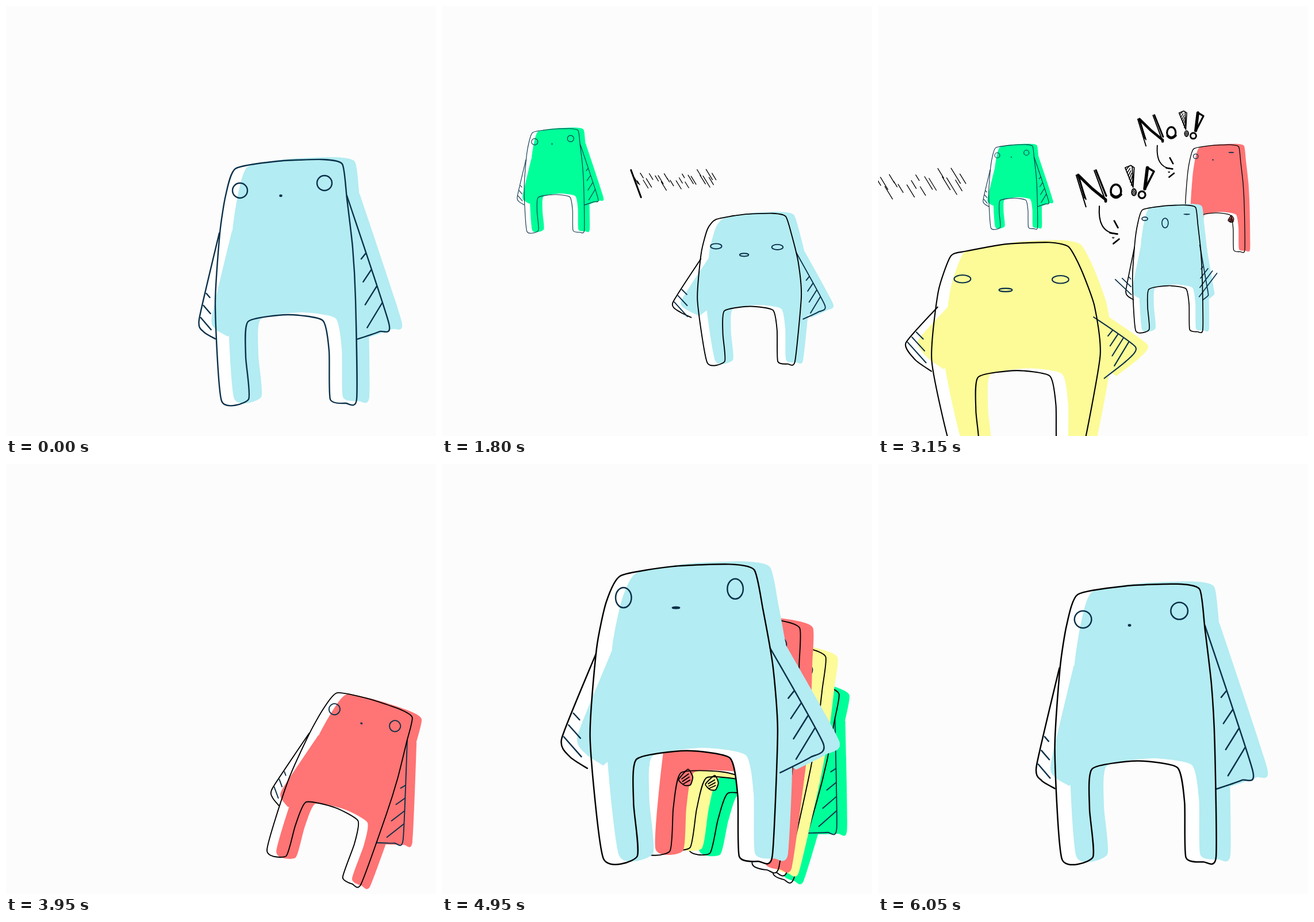
Animation, 748 px wide and 748 px high, one loop 6.1 s. Source, as an HTML page:

```html
<!DOCTYPE html>
<html lang="en">
<head>
<meta charset="utf-8">
<title>No!!</title>
<style>
html, body { margin: 0; width: 100%; height: 100%; overflow: hidden; background: #fcfcfc; }
svg { display: block; width: 100%; height: 100%; }
path, ellipse { vector-effect: non-scaling-stroke; }
</style>
</head>
<body>
<svg id="stage" viewBox="0 0 748 748" fill="none" stroke-linecap="round" stroke-linejoin="round"></svg>
<script>
const LOOP = 6100, STEP = 50, GROUND = 690, PIVOT = 610;
const NAVY = '#0a3049', BLACK = '#000';
const BLUE = '#b3ecf2', GREEN = '#00ff99', YELLOW = '#fcfb98', RED = '#ff7474';
const stage = document.getElementById('stage');

// A pose is a handful of deformations of one resting figure.
const CALM = {
  squash: 0, tall: 1, armL: 0, armR: 0, lift: 0, shoulder: 0, flail: 0,
  eyeDrop: 0, eyeW: 13, eyeH: 13, wink: 1, mouthDrop: 0, mouthW: 1.5, mouthH: 1
};
const SHOUT = { ...CALM, tall: 1.045, armL: 5, armR: -38, shoulder: 58, flail: 1,
  eyeDrop: -8, eyeW: 10, eyeH: 6, wink: .08, mouthDrop: -3, mouthW: 11, mouthH: 17 };
const GRUMBLE = { ...SHOUT, eyeH: 10, mouthW: 1.5, mouthH: 1 };
const SQUINT = { ...CALM, squash: 1, armL: -53, armR: 24, lift: -18, shoulder: 64,
  eyeDrop: 55, eyeW: 15, eyeH: 7, mouthDrop: 69, mouthW: 12, mouthH: 4 };
const CRUSHED = { ...SQUINT, squash: 1.8, armL: -46, armR: 40, lift: -58, shoulder: 110,
  eyeDrop: 50, mouthDrop: 61, mouthH: 3 };
const WIDE = { ...CALM, squash: .5, armL: -19, armR: 15, lift: -25, shoulder: 64,
  eyeDrop: 3, eyeW: 11, eyeH: 14, mouthDrop: 8, mouthW: 5, mouthH: 1 };
const PUFFED = { ...WIDE, squash: 1.2, tall: .95, armL: -53, armR: 24 };
const TALL = { ...CALM, tall: 1.21 };
const REST = { ...CALM, tall: 1.025 };

// Places the right foot at x, y.
const put = (s, x, y, deg = 0) => ({ s, x, y, deg });
const frame = ({ s, x, y, deg }) =>
  `translate(${x} ${y}) rotate(${deg}) scale(${s}) translate(${-PIVOT} ${-GROUND})`;

const clamp = k => Math.max(0, Math.min(1, k));
const ease = k => k * k * (3 - 2 * k);
const mix = (a, b, k) => a + (b - a) * k;
const between = (a, b, k) => [mix(a[0], b[0], k), mix(a[1], b[1], k)];
const shift = (a, x, y) => [a[0] + x, a[1] + y];

function track(t, ...keys) {
  if (t <= keys[0][0]) return keys[0][1];
  for (let i = 1; i < keys.length; i++) {
    const [t0, p] = keys[i - 1], [t1, q] = keys[i];
    if (t > t1) continue;
    const k = ease((t - t0) / (t1 - t0));
    return Object.fromEntries(Object.keys(p).map(name => [name, mix(p[name], q[name], k)]));
  }
  return keys[keys.length - 1][1];
}

const n = v => v.toFixed(1);
const xy = p => p.map(n).join(' ');
const segment = (a, b) => `M${xy(a)}L${xy(b)}`;

function curve(pts, closed) {
  const last = pts.length - 1;
  const pt = i => closed ? pts[(i + pts.length) % pts.length] : pts[Math.max(0, Math.min(last, i))];
  let d = 'M' + xy(pt(0));
  for (let i = 0; i < (closed ? pts.length : last); i++) {
    const [o, a, b, c] = [pt(i - 1), pt(i), pt(i + 1), pt(i + 2)];
    const bend = (p, q, r, k) => p.map((v, j) => v + (r[j] - q[j]) * k);
    d += `C${xy(bend(a, o, b, .1))} ${xy(bend(b, a, c, -.1))} ${xy(b)}`;
  }
  return closed ? d + 'Z' : d;
}

const stroke = (d, w, c = BLACK) => `<path d="${d}" stroke="${c}" stroke-width="${n(w)}"/>`;
const paint = (d, c) => `<path d="${d}" fill="${c}"/>`;

function outline(p) {
  const q = p.squash, top = 21 * q;
  return [
    [399, 283 + top], [472, 270 + top], [550, 267 + top], [585, 275 + top],
    [593 + 8 * q, 335 + 10 * q], [603 + 16 * q, 420], [608 + 19 * q, 510],
    [610, 684], [591, 691], [564, 684], [562, 600], [551, 547],
    [490, 537], [421, 549], [417, 610], [422, 684], [375, 687],
    [364 - 15 * q, 520], [372 - 13 * q, 395], [382 - 6 * q, 330]
  ].map(([x, y]) => [x, GROUND - (GROUND - y) * p.tall]);
}

function arms(p) {
  const q = p.squash;
  const fromL = [371 - 13 * q, 395 + 15 * q], tipL = [336 + p.armL, 545 + p.lift];
  const endL = [364 + .6 * p.armL, 579 + .7 * p.lift];
  const fromR = [593 + .11 * p.shoulder + 14 * q, 330 + p.shoulder], tipR = [666 + p.armR, 552 + p.lift];
  const endR = [610 + 22 * q, 580 + .5 * p.lift];
  const left = [fromL, tipL, shift(between(tipL, endL, .5), -6, 5), endL];
  const right = [fromR, tipR, shift(between(tipR, endR, .4), 6, 3), endR];
  let hatch = '';
  for (let i = 0; i < 4; i++) {
    const out = between(fromR, tipR, .45 + .13 * i);
    hatch += segment(shift(out, -8 - 6 * i, 10 + 11 * i), shift(out, p.flail * i * 12, -p.flail * i * 13));
  }
  for (let i = 0; i < 3; i++) {
    const out = between(fromL, tipL, .7 + .14 * i), grow = 1 - p.armL / 60;
    hatch += segment(shift(out, (8 + 6 * i) * grow, (7 + 7 * i) * grow), shift(out, 2 - p.flail * i * 20, -p.flail * i * 17));
  }
  return { left: curve(left), right: curve(right), hatch };
}

// A folded arm peeping out below the belly.
function hand(x, colour, width) {
  const y = 555;
  const palm = [[x - 11, y + 6], [x + 2, y - 14], [x + 12, y - 2], [x + 10, y + 12], [x, y + 14]];
  let d = curve(palm, true);
  const back = paint(d, colour);
  for (let i = 0; i < 3; i++) d += segment([x - 6 + i * 2, y + 4 + i * 4], [x + 4 + i * 2, y - 6 + i * 5]);
  return back + stroke(d, width);
}

function figure(p, place, colour, width, ink = BLACK, handX = 0) {
  const body = curve(outline(p), true), arm = arms(p);
  const join = 'L490 450Z';
  const parts = handX ? [body] : [body, arm.left + join, arm.right + join];
  const fill = c => parts.map(d => paint(d, c)).join('');
  const oval = (x, y, rx, ry) =>
    `<ellipse cx="${n(x)}" cy="${n(GROUND - (GROUND - y) * p.tall)}" rx="${n(rx)}" ry="${n(ry)}" stroke="${NAVY}" stroke-width="${width}"/>`;
  const limbs = handX ? hand(handX, colour, width)
    : stroke(arm.left, width, ink) + stroke(arm.right, width, NAVY) + stroke(arm.hatch, width, NAVY);
  return `<g transform="${frame(place)}">${fill('#fff')}<g transform="translate(22 -4)">${fill(colour)}</g>` +
    limbs + stroke(body, width, ink) +
    oval(407 - 8 * p.squash, 321 + p.eyeDrop, p.eyeW, p.eyeH) +
    oval(554 + 9 * p.squash, 308 + 1.28 * p.eyeDrop, p.eyeW, p.eyeH * p.wink) +
    oval(478 - 4 * p.squash, 330 + p.mouthDrop, p.mouthW, p.mouthH) + '</g>';
}

const ring = (x, y, rx, ry) => `M${x - rx} ${y}a${rx} ${ry} 0 1 1 ${2 * rx} 0a${rx} ${ry} 0 1 1 ${-2 * rx} 0Z`;

function lettering(k) {
  let shade = '';
  for (let i = 0; i < 6; i++) shade += segment([342 + i * 3.5, 124 + i * 11], [352 + i * 3, 112 + i * 8]);
  for (let i = 0; i < 3; i++) shade += segment([362 + i * 3, 205 + i * 4], [370 + i * 3, 194 + i * 4]);
  return stroke('M167 143L201 254M172 143L201 228M230 127L270 234', 3 * k) +
    stroke('M174 143L197 222M236 126L272 216', 4.5 * k) +
    stroke('M174 143L222 190L270 229V235', 7 * k) +
    stroke(ring(306, 199, 18, 23), 5 * k) + stroke('M291 212Q306 228 323 211', 7 * k) +
    stroke('M338 117L358 109L370 117L366 186ZM363 113L366 180' + ring(369, 203, 8, 12), 2.5 * k) +
    stroke(shade, 2 * k) +
    stroke('M417 117L439 130L408 191Z', 5 * k) + stroke('M416 117L407 191', 8 * k) +
    stroke(ring(397, 212, 12, 12), 4.5 * k) +
    stroke('M248 252C244 305 257 346 311 349', 3 * k) +
    stroke('M285 345L311 349M300 303L313 327M297 383L317 367', 4 * k) +
    stroke('M293 361H300M294 364H299', 1.5 * k);
}

// Loose pencil strokes, sketched before the letters.
function scribble() {
  let d = '';
  for (let i = 0; i < 28; i++) {
    const x = 180 + i * 8, len = 20 + 8 * Math.sin(i * 5) + (i > 20 ? 8 : 0);
    const y = 192 + 12 * Math.sin(i * 2.3) - (i > 20 ? 10 : 0);
    if (i % 7 !== 6) d += segment([x, y], [x + len * .52, y + len * .85]);
  }
  return stroke(d, 1.3) + stroke('M171 172L198 245', 3);
}

function say(place, u) {
  const art = u < 0 ? scribble() : lettering(Math.sqrt(place.s));
  const rise = ease(clamp((u - 320) / 200));
  return `<g transform="${frame(place)} translate(${n(-3 * rise)} ${n(-16 * rise)})">${art}</g>`;
}

// Squeeze, shout and relax; u counts from the shout.
function shouter(t, { peaks, place, colour, width, squint = SQUINT, shout = SHOUT, handX }) {
  const u = t - peaks.filter((p, i) => i === 0 || t >= p - 300).pop();
  const pose = track(u, [-300, CALM], [-100, squint], [-50, squint], [50, shout], [350, shout], [550, CALM]);
  const ink = t < 500 ? NAVY : BLACK;
  const talk = u >= -50 && u < 700 ? say(place, u) : '';
  return figure(pose, place, colour, width, ink, handX) + talk;
}

const BLUE_FAR = put(.65, 614, 622), BLUE_CROWD = put(.497, 565, 566);
const GREEN_FAR = put(.425, 247.5, 393), GREEN_CROWD = put(.345, 277.5, 387);
const RED_CROWD = put(.42, 638, 427);
const RED_BACK = put(.68, 627, 738, 24);

function crowd(t) {
  let out = '';
  if (t >= 1200) {
    const green = track(t, [1150, put(.1, 247.5, 393)], [1350, GREEN_FAR], [1850, GREEN_FAR],
      [1950, put(.425, 203, 393)], [2150, GREEN_FAR], [2250, GREEN_FAR], [2500, GREEN_CROWD]);
    out += figure(CALM, green, GREEN, 1.1, NAVY);
  }
  if (t >= 2200) out += shouter(t, {
    peaks: [2800], colour: RED, width: 1.3, shout: GRUMBLE, handX: 552,
    place: track(t, [2200, put(.55, 800, 420)], [2550, RED_CROWD], [3600, RED_CROWD], [3750, RED_BACK])
  });
  const blue = track(t, [1150, put(1, PIVOT, GROUND)], [1350, BLUE_FAR], [2250, BLUE_FAR], [2500, BLUE_CROWD]);
  out += shouter(t, {
    peaks: [500, 1850, 2950], colour: BLUE, place: blue, width: 1 + 1.4 * blue.s,
    squint: t < 1000 ? CRUSHED : SQUINT
  });
  if (t >= 2500) out += shouter(t, {
    peaks: [3200], colour: YELLOW, width: 2.1, squint: CRUSHED,
    place: track(t, [2450, put(.96, 355.6, 1200)], [2750, put(.96, 355.6, 781)])
  });
  return out;
}

function queue(t) {
  const BACK = put(.74, 616, 735, 20.6), HIDDEN = put(.9, 560, 690);
  const step = (colour, from, start, arrive, place, handX) => t < from || t >= 5400 ? '' :
    figure(CALM, track(t, ...start, [arrive, place], [5150, place], [5400, HIDDEN]), colour, 1.9, BLACK, handX);
  let out = step(GREEN, 4500, [[4500, put(.7, 622, 738, 22)]], 4900, put(.81, 610, 727, 17.3)) +
    step(YELLOW, 4150, [[4150, BACK]], 4850, put(.925, 599, 714, 13.7), 433) +
    step(RED, 3750, [[3800, RED_BACK], [3950, BACK]], 4450, put(1.02, 585, 708, 8.5), t < 4350 ? 0 : 430);
  if (t < 4500) return out;
  const wide = put(1.25, 574.5, 690), puffed = put(1.3, 590, 690), rest = put(1.24, 565, 690);
  const pose = track(t, [4500, CALM], [4700, PUFFED], [4850, WIDE], [5150, WIDE], [5300, PUFFED],
    [5500, TALL], [5800, REST], [5950, REST], [6050, CALM]);
  const place = track(t, [4500, put(1, 582, 694, 4)], [4700, puffed], [4850, wide], [5150, wide],
    [5300, puffed], [5500, put(1.1, 570, 690)], [5800, rest], [5950, rest], [6050, put(1.14, 588, 691)]);
  return out + figure(pose, place, BLUE, 2.5);
}

const start = performance.now();
let shown = -1;
function tick() {
  const t = Math.floor((performance.now() - start) % LOOP / STEP) * STEP;
  if (t !== shown) {
    shown = t;
    stage.innerHTML = t < 3750 ? crowd(t) : queue(t);
  }
  requestAnimationFrame(tick);
}
tick();
</script>
</body>
</html>
```
